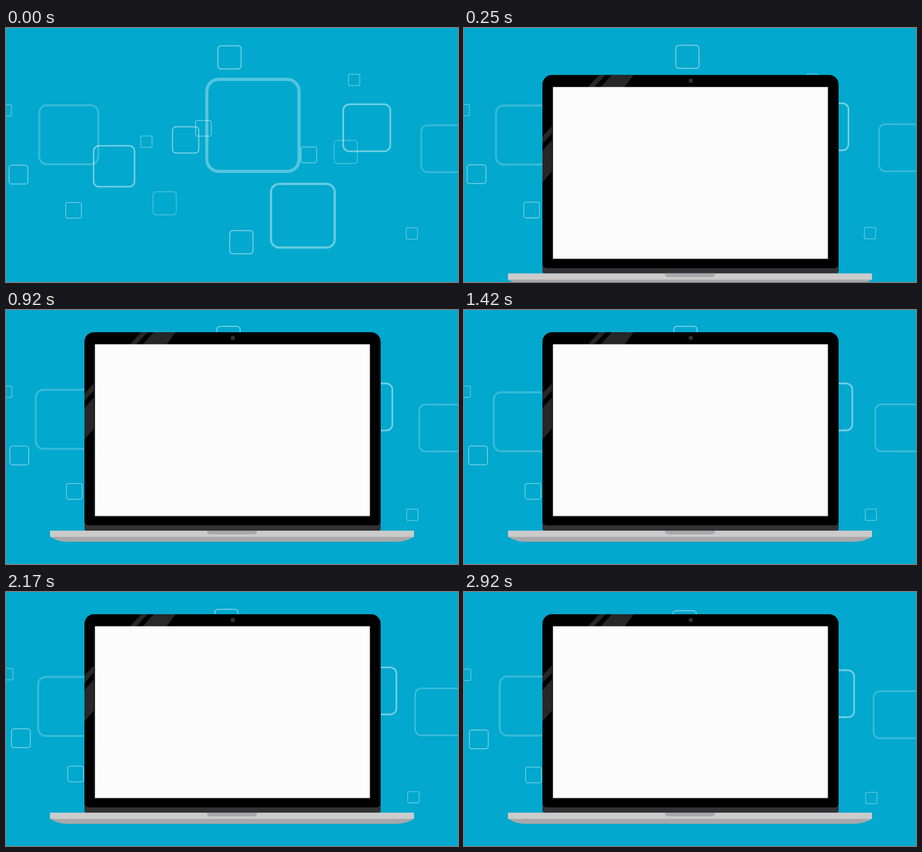
Recreate the animation shown at these times as an HTML page. Size 853 by 480 pixels, loop 3.01 s.

```html
<!DOCTYPE html>
<html lang="en">
<head>
<meta charset="utf-8">
<title>Laptop slide-in</title>
<style>
  html, body { margin: 0; height: 100%; overflow: hidden; background: #02a8cd; }
  svg { display: block; width: 100%; height: 100%; }
</style>
</head>
<body>
<svg viewBox="0 0 853 480">
  <g id="squares" fill="none" stroke="#fff"></g>
  <g id="laptop">
    <rect x="148" y="380" width="559" height="37" rx="4" fill="#333234"/>
    <path d="M148 60A18 18 0 0 1 166 42H689A18 18 0 0 1 707 60V399A8 8 0 0 1 699 407H156A8 8 0 0 1 148 399Z"/>
    <path d="M255 42H267L148 172V158ZM279 42H320L303 65L165 225L148 245V185Z" fill="#272727"/>
    <path d="M165.5 65H688V391.5H165.5Z" fill="#1d1d1f"/>
    <path d="M168 64.8H686.6V389.3H168Z" fill="#fcfcfc"/>
    <circle cx="428" cy="52.8" r="4" fill="#333"/>
    <path d="M83 428H770Q757 438 735 438H118Q96 438 83 428Z" fill="#a8a8aa"/>
    <path d="M83 417H770V428.7H83Z" fill="#cbcbcb"/>
    <path d="M379 417H474Q474 424 467 424H386Q379 424 379 417Z" fill="#a8a8aa"/>
  </g>
</svg>
<script>
const LOOP = 3010, STEP = 1000 / 12, LAST_STEP = 35;
const ORBIT = 5000, SLIDE = 504, TURN = 2 * Math.PI;

// Squares ride on circles: phase is a share of a turn, spin is the direction.
const fromLeft = { phase: .51, spin: 1 };
const fromRight = { phase: -.01, spin: -1 };
const fromTop = { phase: -.26, spin: -1 };

const squaresLayer = document.getElementById("squares");
const laptop = document.getElementById("laptop");
const squares = [];

const moveTo = (node, x, y) => node.setAttribute("transform", `translate(${x} ${y})`);

// Line weight, corner, opacity and orbit radius all follow from the size.
function addSquares(size, centres, { orbit = fromLeft, dim = 1 } = {}) {
  const stroke = .3 + size * .0315, side = size - stroke;
  for (const [x, y] of centres) {
    const node = document.createElementNS("http://www.w3.org/2000/svg", "rect");
    const attrs = {
      x: x - side / 2, y: y - side / 2, width: side, height: side,
      rx: size * .125, "stroke-width": stroke,
      "stroke-opacity": dim * (.56 - size * .0013),
    };
    for (const name in attrs) node.setAttribute(name, attrs[name]);
    squaresLayer.append(node);
    squares.push({ node, orbit, radius: size * .065 });
  }
}

addSquares(22.5, [[-.5, 155.7], [265, 214.7], [657, 98], [766, 388.3]]);
addSquares(31, [[127.5, 344.5], [372.5, 189.5], [571.5, 239.7]]);
addSquares(37, [[23.5, 277]]);
addSquares(45.5, [[421.8, 55.4], [444.2, 404.8]], { orbit: fromRight });
addSquares(45.5, [[299.5, 331.3], [641, 234.3]], { dim: .55 });
addSquares(51.5, [[339, 211.5]]);
addSquares(80, [[204, 261.3]]);
addSquares(92, [[680.8, 188.6]]);
addSquares(92, [[828.2, 228.2]], { orbit: fromRight, dim: .5 });
addSquares(115.5, [[118.5, 201.7]], { orbit: fromTop, dim: .5 });
addSquares(124.5, [[560.2, 354.8]]);
addSquares(180, [[466, 184]]);

function draw(now) {
  // The motion is held at 12 steps per second.
  const step = Math.min(LAST_STEP, Math.floor((now % LOOP + 4) / STEP));
  const time = step * STEP;
  for (const { node, orbit, radius } of squares) {
    const start = orbit.phase * TURN;
    const angle = start + orbit.spin * TURN * time / ORBIT;
    moveTo(node,
      radius * (Math.cos(angle) - Math.cos(start)),
      radius * (Math.sin(angle) - Math.sin(start)));
  }
  moveTo(laptop, 0, 480 * Math.max(0, 1 - time / SLIDE) ** 3.4);
  requestAnimationFrame(draw);
}
draw(0);
</script>
</body>
</html>
```
